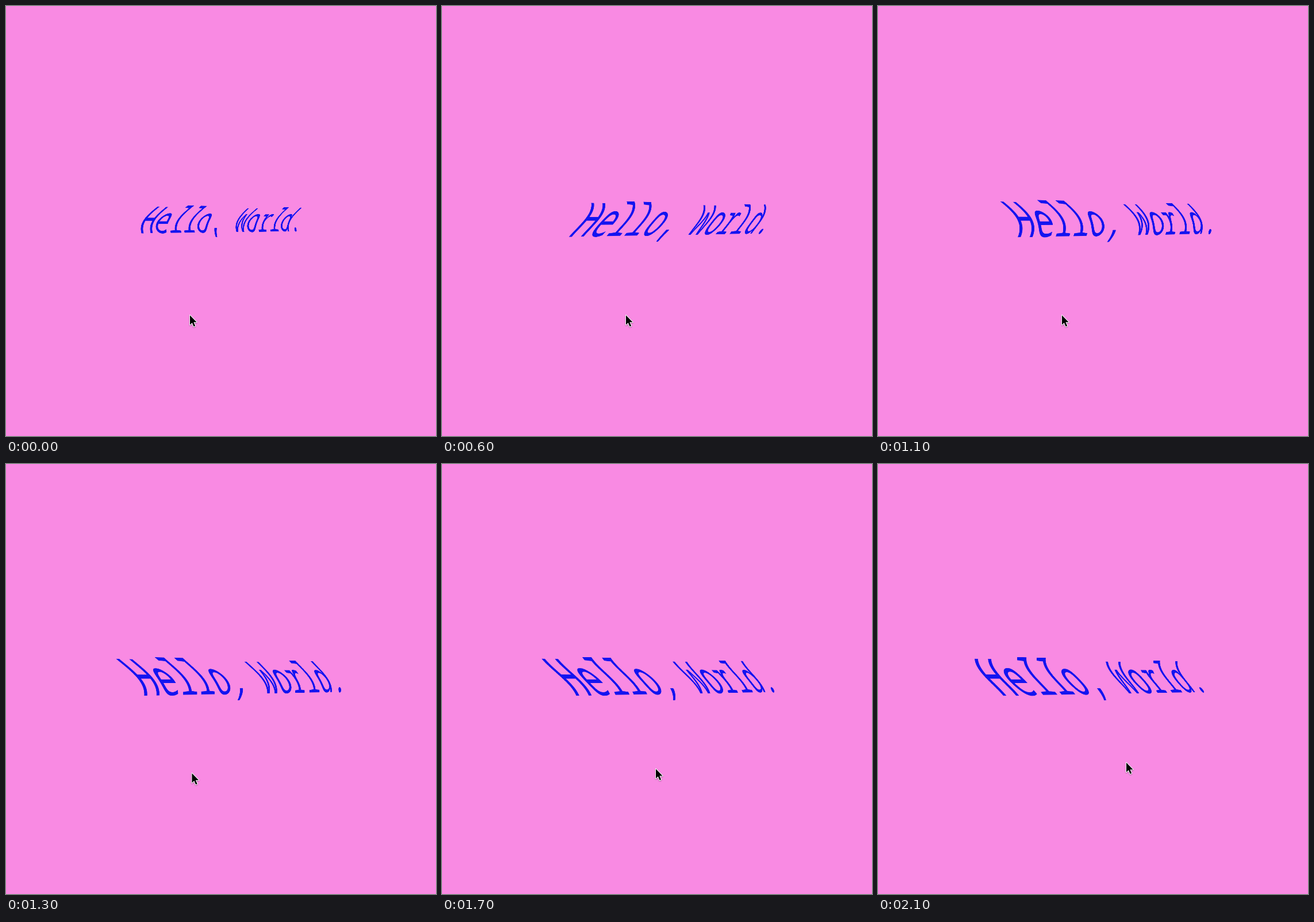
An HTML page with a canvas for the animation above (2.2 s loop, 748x748 px).

```html
<!DOCTYPE html>
<html lang="en">
<head>
<meta charset="utf-8">
<title>Hello, World.</title>
<style>
  html, body { margin: 0; height: 100%; overflow: hidden; background: #f98ae3; }
  canvas { display: block; }
</style>
</head>
<body>
<canvas id="stage" width="748" height="748"></canvas>
<script>
const SIZE = 748, MID = SIZE / 2, LOOP = 2200, STEP = 100;
const Q = 2;                 // oversampling of the text plane
const W = 900, H = 110;      // text plane
const SQUEEZE = 0.607;       // foreshortening of the plane turned about its vertical axis
const DEPTH = 0.0007;        // shrink per pixel towards the right

// time, size of the plane, wave clock
const POSES = [
  [0, 0.74, -200], [400, 0.87, 320], [600, 0.94, 580], [900, 0.955, 1030],
  [1300, 1, 1420], [1700, 1, 1690], [2100, 0.995, 2000]
];
// time, pointer x, pointer y
const POINTER = [
  [0, 320, 538], [1200, 320, 538], [1300, 323.5, 538],
  [1700, 372, 530.5], [2100, 432, 519.5]
];

function at(keys, t) {
  let i = 1;
  while (i < keys.length - 1 && keys[i][0] < t) i++;
  const a = keys[i - 1], b = keys[i];
  const p = Math.min(1, (t - a[0]) / (b[0] - a[0]));
  return a.slice(1).map((v, j) => v + (b[j + 1] - v) * p);
}

function plane() {
  const c = document.createElement('canvas');
  c.width = W * Q;
  c.height = H * Q;
  return c.getContext('2d');
}

const ctx = document.getElementById('stage').getContext('2d');
const flat = plane(), wavy = plane();

flat.scale(Q, Q);
flat.font = '500 80.7px "Noto Sans Mono", "Liberation Mono", monospace';
flat.textAlign = 'center';
flat.fillStyle = '#1414f0';
flat.fillText('Hello, World.', W / 2, H / 2 + 26.5);

const arrow = new Path2D('M0 0V16.6L3.8 13L6.6 19.6L9.2 18.5L6.4 12H11.6Z');

// Slide each row sideways along a sine that travels downwards.
function bend(clock) {
  wavy.clearRect(0, 0, W * Q, H * Q);
  for (let y = 0; y < H * Q; y++) {
    const v = (y + 0.5) / Q - H / 2;
    const phase = 2 * Math.PI * (clock - 185 - 15.65 * v) / 3000;
    const shift = 68 + (48 - 0.3 * v) * Math.sin(phase);
    wavy.drawImage(flat.canvas, 0, y, W * Q, 1, shift * Q, y, W * Q, 1);
  }
}

// Project the plane column by column.
function project(size) {
  const source = x => (x / (1 - DEPTH * x) / size / SQUEEZE + W / 2) * Q;
  for (let x = -240; x < 240; x++) {
    const left = source(x), right = source(x + 1);
    if (left < 0 || right > W * Q) continue;
    const h = H * size * (1 - DEPTH * (x + 0.5));
    ctx.drawImage(wavy.canvas, left, 0, right - left, H * Q, MID + x, MID - h / 2, 1, h);
  }
}

function drawPointer(x, y) {
  ctx.save();
  ctx.translate(x, y);
  ctx.lineJoin = 'round';
  ctx.lineWidth = 2;
  ctx.strokeStyle = '#fff';
  ctx.shadowColor = 'rgba(0,0,0,.35)';
  ctx.shadowBlur = 2;
  ctx.shadowOffsetY = 1;
  ctx.stroke(arrow);
  ctx.shadowColor = 'transparent';
  ctx.fill(arrow);
  ctx.restore();
}

function draw(t) {
  const [size, clock] = at(POSES, t);
  ctx.fillStyle = '#f98ae3';
  ctx.fillRect(0, 0, SIZE, SIZE);
  bend(clock);
  project(size);
  ctx.fillStyle = '#000';
  drawPointer(...at(POINTER, t));
}

const start = performance.now();
let shown = -1;
function tick() {
  const t = Math.floor((performance.now() - start) % LOOP / STEP) * STEP;
  if (t !== shown) draw(shown = t);
  requestAnimationFrame(tick);
}
tick();
</script>
</body>
</html>
```
